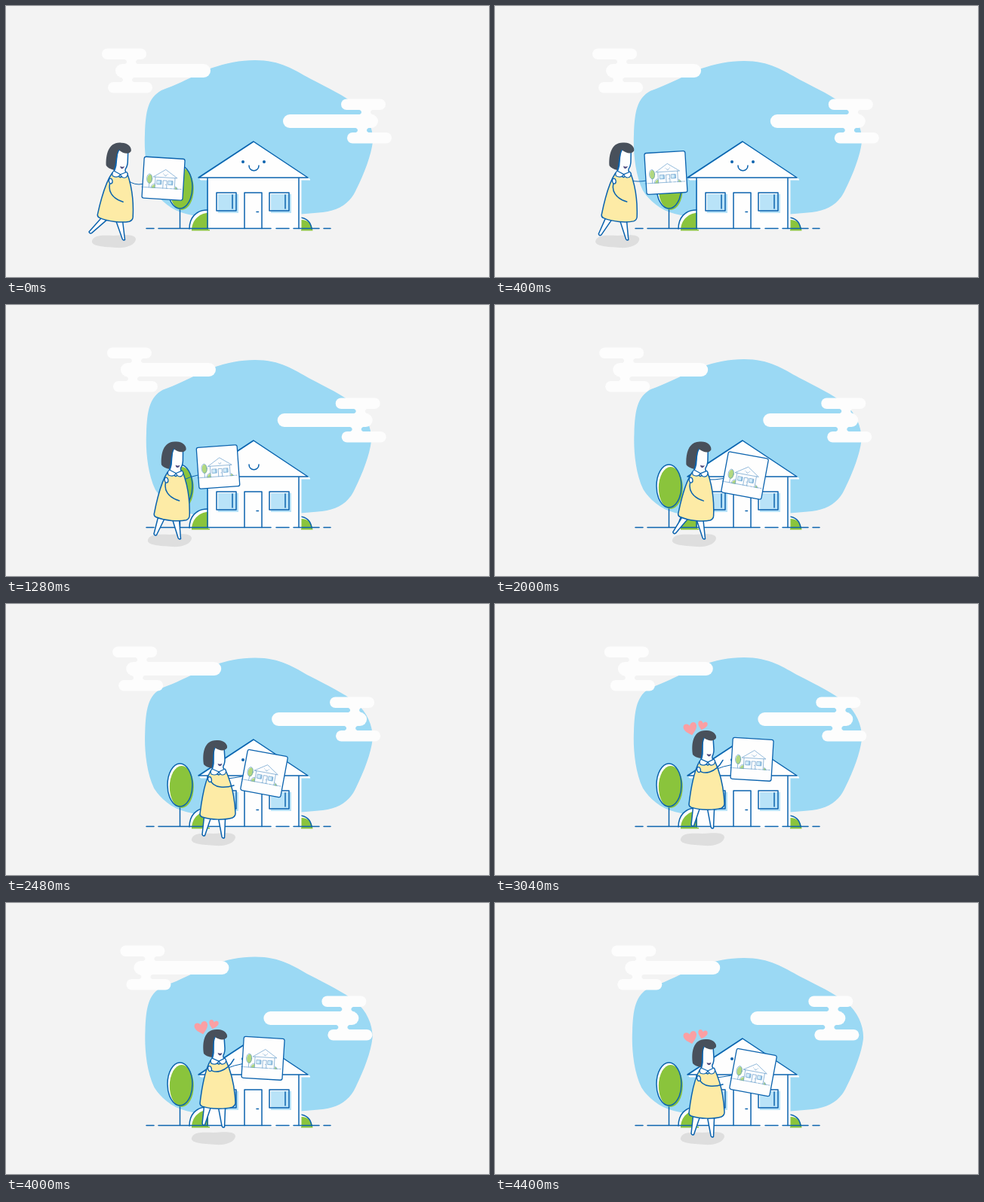
These frames come from a looping animation (640x360 px, 4480 ms). An HTML page:

```html
<!DOCTYPE html>
<html lang="en">
<head>
<meta charset="utf-8">
<title>House hunting</title>
<style>
  html, body { margin: 0; width: 100%; height: 100%; overflow: hidden; background: #f3f3f3; }
  svg { display: block; width: 100vw; height: 100vh; }
  .line { fill: none; stroke: #0b63ae; stroke-linecap: round; stroke-linejoin: round; }
  .white { fill: #fefefe; }
  .cloud { fill: #fdfdfd; }
  .green { fill: #8ac43c; }
  .glass { fill: #b9e3f8; }
</style>
</head>
<body>
<svg id="stage" viewBox="0 0 640 360"></svg>
<script>
const LOOP = 4480, STEP = 80, BEAT = 480;

const bar = (x, y, w, h) => `<rect x="${x}" y="${y}" width="${w}" height="${h}" rx="${h / 2}"/>`;
const joint = (x, y) =>
  `<path d="M${x - 12} ${y - 1}q6 1 6 4t-6 4h24q-6 -1 -6 -4t6 -4z"/>`;
const cloud = `
  ${bar(127, 56.5, 59, 14.5)}${bar(145, 77, 126, 18)}${bar(135, 101, 59, 14.5)}
  ${joint(166, 71)}${joint(161, 95)}`;

const pane = x => `
  <rect class="glass" x="${x + 2}" y="250" width="27" height="25"/>
  <rect class="line" x="${x}" y="248" width="26" height="24"/>
  <path class="line" d="M${x + 21} 251v18"/>`;

const scene = strokeWidth => `
  <g stroke-width="${strokeWidth}">
    <path class="line" d="M230.5 241V295"/>
    <ellipse class="white" cx="230.5" cy="240.5" rx="16.5" ry="28.5"/>
    <ellipse class="green" cx="232.8" cy="243" rx="16" ry="28"/>
    <ellipse class="line" cx="230.5" cy="240.5" rx="16.5" ry="28.5"/>
    <path class="white" d="M243 296C243 281 252 271 267 271V296Z"/>
    <path class="green" d="M246 298.500C246 284 256 275 270 274.500V298.500Z"/>
    <path class="line" d="M243 296C243 281 252 271 267 271"/>
    <path class="white" d="M388 281C398 281 404 287 405 296H388Z"/>
    <path class="green" d="M391 284C400 284 406 290 406.500 298.500H391Z"/>
    <path class="line" d="M388 281C398 281 404 287 405 296"/>
    <path class="white" d="M268 230H391.500V297H268Z"/>
    <path class="white" d="M256 229L328 181L403 230V231.500H258Z"/>
    <path class="line" d="M267 229V295.500M388 229V295.500M255 228L328 180L400 228Z"/>
    ${pane(279)}${pane(349)}
    <path class="line" d="M316 295.500V248H339V295.500M332 273.500h2.500"/>
    <path class="line" d="M186 295.500h10M202 295.500H351M358 295.500h17M381 295.500h34M421 295.500h9"/>
    <path class="line" d="M322 212C322 221 335 221 335 212"/>
    <g class="eyes" fill="#0b63ae"><circle cx="314" cy="207" r="2"/><circle cx="342" cy="207" r="2"/></g>
  </g>`;

const heart = (x, y, size, turn) =>
  `<path fill="#fb9fa3" transform="translate(${x} ${y}) rotate(${turn}) scale(${size})"
    d="M0 9C-5 5 -9 1 -9 -3C-9 -9 -2 -9 0 -4C2 -9 9 -9 9 -3C9 1 5 5 0 9Z"/>`;

document.getElementById('stage').innerHTML = `
  <rect width="640" height="360" fill="#f3f3f3"/>
  <path id="blob" fill="#9bd9f4" d="M330 72C364 72 382 85 403 96.500C427 109 448 119 463 131
    C480 144 487 165 486 180C484 198 475 222 464 244C456 262 442 271 420 274
    C370 279 310 281 255 279C228 277 208 264 196 245C185 222 183 190 184 170
    C185 140 188 122 206 112C231 103 250 92 272 82.500C292 76 310 72 330 72Z"/>
  <g id="cloudL" class="cloud">${cloud}</g>
  <g id="cloudR" class="cloud"><g transform="rotate(180 319 119.500)">${cloud}</g></g>
  ${scene(1.5)}
  <path id="shadow" fill="#dedede" d="M246 312C249 303 262 305 275 305C290 304 304 303 304 310
    C303 318 290 322 278 321C262 320 244 319 246 312Z"/>
  <path id="holdArm" class="line" stroke-width="1"/>
  <g id="card">
    <rect class="line" style="fill:#fefefe" stroke-width="1.3" x="-27" y="-27.500" width="54" height="55" rx="2.500"/>
    <g opacity=".65" transform="translate(2.500 -12) scale(.215) translate(-328 -180)">${scene(3)}</g>
  </g>
  <g id="girl" stroke-width="1.5">
    <path id="backLeg" class="line" style="fill:#fefefe"/>
    <path id="frontLeg" class="line" style="fill:#fefefe"/>
    <g id="body">
      <path class="line" style="fill:#fdeba6" d="M271 222C263 236 259 262 257 279Q257 282 260 283
        C272 287 290 287 300 284Q304 282 304 278C303 255 298 236 291 221Z"/>
      <path class="line" style="fill:#fefefe" d="M275 189V212Q274 219 272 222L282 227L291 221
        Q287 219 288 215Q290 212 290 206L289 190Z"/>
      <path class="line" style="fill:#fefefe" stroke-width="1.2" d="M273 219Q270 222 272 226Q279 229 282 223Q285 229 290 226Q293 222 290 219L282 223Z"/>
      <path fill="#48505b" d="M262 213C260 199 262 181 279 181C288 180 294 186 293 191
        C290 196 283 195 277 191C273 199 276 210 273 218Q265 217 262 213Z"/>
      <path class="line" stroke-width="1.300" d="M277 191C273 199 276 210 273 218"/>
      <path fill="#4d4a7d" d="M280.500 212Q283.500 213.500 286.500 211.800Q285.500 215.500 283 215.300Q281 215 280.500 212Z"/>
      <path id="freeArm" class="line"/>
      <ellipse class="line" style="fill:#fefefe" stroke-width="1.300" cx="270" cy="233" rx="2.300" ry="3.500" transform="rotate(-15 270 233)"/>
    </g>
    <g id="hearts">${heart(259, 178.5, 0.98, -14)}${heart(275, 174, 0.7, 14)}</g>
  </g>`;

const part = Object.fromEntries([...document.querySelectorAll('[id]')].map(e => [e.id, e]));
const eyes = document.querySelectorAll('.eyes');
const place = (e, transform) => e.setAttribute('transform', transform);
const mix = (a, b, k) => a + (b - a) * k;
const smooth = k => k * k * (3 - 2 * k);

// Value at time t along [time, value] points.
function along(points, t, ease = k => k) {
  const i = points.findIndex(p => p[0] > t);
  if (i === 0) return points[0][1];
  if (i < 0) return points[points.length - 1][1];
  const [t0, a] = points[i - 1], [t1, b] = points[i];
  return mix(a, b, ease((t - t0) / (t1 - t0)));
}

const WALK = [[0, 143], [560, 170], [800, 184], [1280, 217], [2000, 264], [2240, 275]];
const STRIDE = [[1840, 1], [2000, 0.6], [2240, 0]];
const HOLD = [[0, 10], [800, 6], [1280, 2], [2000, 1.5], [2300, 0]];
const SQUEEZE = [[0, 0], [800, 0], [1280, 2], [2000, 0.5], [3040, 0], [3600, 3], [4400, -2]];
const TOP = [[0, 72], [800, 74], [1280, 73], [2000, 72], [3040, 71], [3600, 70], [4400, 73]];
const POP = [[2480, 0], [2640, 1.1], [2720, 1]];

const leg = (hipX, hipY, footX, footY) =>
  `M${hipX - 4.5} ${hipY}L${footX - 2} ${footY - 2}Q${footX - 1} ${footY + 1} ${footX + 1.5} ${footY - 0.5}L${hipX + 4.5} ${hipY + 1}`;

function draw(t) {
  const drift = 0.0051 * t + 2.5e-7 * t * t;
  place(part.cloudL, `translate(${drift} 0)`);
  place(part.cloudR, `translate(${-drift * 1.05} 0)`);
  const sx = 1 - along(SQUEEZE, t, smooth) / 152;
  const sy = (277 - along(TOP, t, smooth)) / 205;
  place(part.blob, `translate(335 277) scale(${sx} ${sy}) translate(-335 -277)`);
  const blink = t >= 1200 && t < 1440;
  eyes.forEach(e => e.setAttribute('visibility', blink ? 'hidden' : 'visible'));

  const beat = ((t - 2000) / BEAT + 10) % 1;
  const swing = Math.cos(beat * 2 * Math.PI);
  const x = along(WALK, t);
  const stride = along(STRIDE, t);
  const pose = Math.min(1, stride * 1.7);
  const hop = t >= 2480 && beat < 0.42 ? 13.6 * Math.sin(beat / 0.42 * Math.PI) : 0;

  // The body leans forward while walking, more so when the trailing foot is far back.
  const reach = stride * (14 + 8 * swing);
  const lean = 3.4 * pose + 0.12 * reach;
  place(part.shadow, `translate(${x - 275} 0)`);
  place(part.girl, `translate(${x - 275} ${-hop})`);
  place(part.body, `rotate(${lean} 275 240)`);
  part.backLeg.setAttribute('d', leg(267 - lean * 0.7, 283 - lean * 0.3, 262 - reach, 308 - reach * 0.33));
  part.frontLeg.setAttribute('d', leg(286 - lean * 0.7, 285, 288, 311));

  const reachY = 241 - hop * 1.6;
  part.freeArm.setAttribute('d', `M270 233C${mix(275, 266, pose)} ${mix(246 - hop * 0.5, 247, pose)} ` +
    `${mix(292, 275, pose)} ${mix(244 - hop * 0.4, 256, pose)} ${mix(302, 289, pose)} ${mix(reachY, 259, pose)}`);

  const tilt = -4 + 14.5 * ((1 + swing) / 2) ** 2.3;
  const cardX = x + 64 + 0.21 * (tilt + 4);
  const cardY = 213 + 0.83 * (tilt + 4) + along(HOLD, t) - hop;
  place(part.card, `translate(${cardX} ${cardY}) rotate(${tilt})`);
  const r = tilt * Math.PI / 180;
  const handX = cardX - 27 * Math.cos(r) - 9 * Math.sin(r);
  const handY = cardY - 27 * Math.sin(r) + 9 * Math.cos(r);
  part.holdArm.setAttribute('d', `M${x + 19} ${232 - hop}Q${x + 27} ${handY + 2} ${handX} ${handY}`);

  place(part.hearts, `translate(268 188) scale(${along(POP, t)}) translate(-268 -188)`);
}

const start = performance.now();
function tick() {
  const t = (performance.now() - start) % LOOP;
  draw(Math.floor(t / STEP) * STEP);
  requestAnimationFrame(tick);
}
tick();
</script>
</body>
</html>
```
